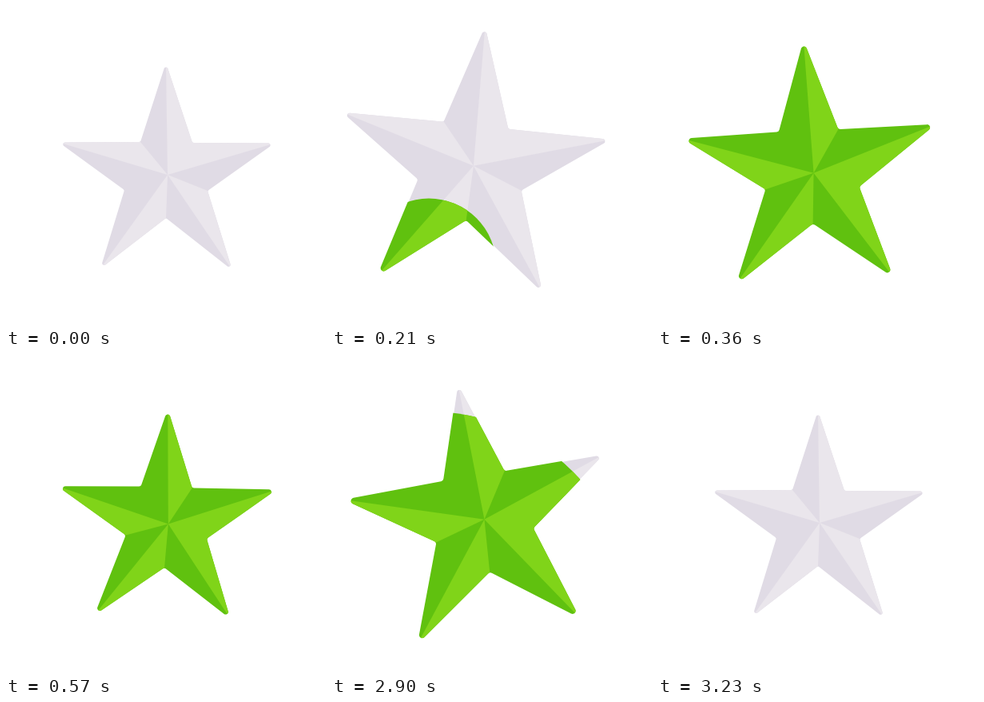
Write an HTML page with a canvas that moves like this. It is 400x400 px and loops after 3.66 s.

```html
<!DOCTYPE html>
<html lang="en">
<head>
<meta charset="utf-8">
<title>Spinning star</title>
<style>
  html, body { margin: 0; width: 100%; height: 100%; overflow: hidden; background: #fff; }
  canvas { display: block; width: 100vmin; height: 100vmin; }
</style>
</head>
<body>
<canvas id="stage" width="400" height="400"></canvas>
<script>
const ctx = document.getElementById('stage').getContext('2d');

const STEP = 30, LAST = 19, BACK = 2690, LOOP = 3660;
const PIVOT = [201.4, 212.3];
const HUB = [202, 211];
const SEED = [121, 325];
const APOTHEM = 43.6, ROUNDING = 2.5;

const GREY = { dark: '#e0dbe5', light: '#eae6ec', grow: 0 };
const GREEN = { dark: '#60c10f', light: '#80d419', grow: 0.7 };

// outline, clockwise from the top: tip, notch, tip, notch...
const OUTLINE = [
  [200, 76], [233, 171], [331, 173], [252, 231], [280, 326],
  [200, 265], [121, 324], [148, 230], [71, 172], [168, 170]
];
// runs of light facets, as outline indices
const LIGHT = [[0, 1, 2], [3, 4], [5, 6], [8, 9]];

const wave = u => Math.sin(Math.PI * u);

// point on the ray from the hub through p, f times as far out
const reach = (p, f) => p.map((v, i) => HUB[i] + (v - HUB[i]) * f);

function poseAt(k) {
  const u = k / LAST;
  const push = wave(u ** 0.7) ** 4;
  return {
    x: -25.4 * push,
    y: -11 * push,
    // swells, then dips slightly under full size before settling
    scale: 1 + 0.283 * Math.abs(wave(u)) ** 1.3 * wave(k / 15.3),
    // one fifth of a turn, just overshot
    angle: 73.2 / (1 + Math.exp(-1.06 * (k - 9.35))) * Math.PI / 180
  };
}

const fillRadius = k => Math.max(0, 42.2 * (k - 5));

function stepAt(t) {
  if (t < BACK) return Math.min(Math.floor(t / STEP), LAST);
  return Math.max(LAST - 1 - Math.floor((t - BACK) / STEP), 0);
}

function place({ x, y, scale, angle }) {
  ctx.translate(PIVOT[0] + x, PIVOT[1] + y);
  ctx.rotate(angle);
  ctx.scale(scale, scale);
  ctx.translate(-PIVOT[0], -PIVOT[1]);
}

// rounded outline, pushed outwards by grow pixels
function trace(grow) {
  const size = 1 + grow / APOTHEM;
  // sharp tips lie further out than the rounded ones that show
  const corners = OUTLINE.map((p, i) => reach(p, size * (i % 2 ? 1 : 1.037)));
  const n = corners.length, [a, b] = corners;
  ctx.beginPath();
  ctx.moveTo((a[0] + b[0]) / 2, (a[1] + b[1]) / 2);
  for (let i = 1; i <= n; i++) {
    ctx.arcTo(...corners[i % n], ...corners[(i + 1) % n], ROUNDING + grow);
  }
  ctx.closePath();
}

function star(pose, { dark, light, grow }) {
  ctx.save();
  place(pose);
  trace(grow);
  ctx.clip();
  ctx.fillStyle = dark;
  ctx.fillRect(0, 0, 400, 400);
  ctx.fillStyle = light;
  for (const run of LIGHT) {
    ctx.beginPath();
    ctx.moveTo(...HUB);
    run.forEach(i => ctx.lineTo(...reach(OUTLINE[i], 1.2)));
    ctx.fill();
  }
  ctx.restore();
}

function draw(k) {
  const pose = poseAt(k);
  ctx.clearRect(0, 0, 400, 400);
  star(pose, GREY);
  ctx.save();
  ctx.beginPath();
  ctx.arc(...SEED, fillRadius(k), 0, 2 * Math.PI);
  ctx.clip();
  star(pose, GREEN);
  ctx.restore();
}

const start = performance.now();
function tick() {
  draw(stepAt((performance.now() - start) % LOOP));
  requestAnimationFrame(tick);
}
tick();
</script>
</body>
</html>
```
